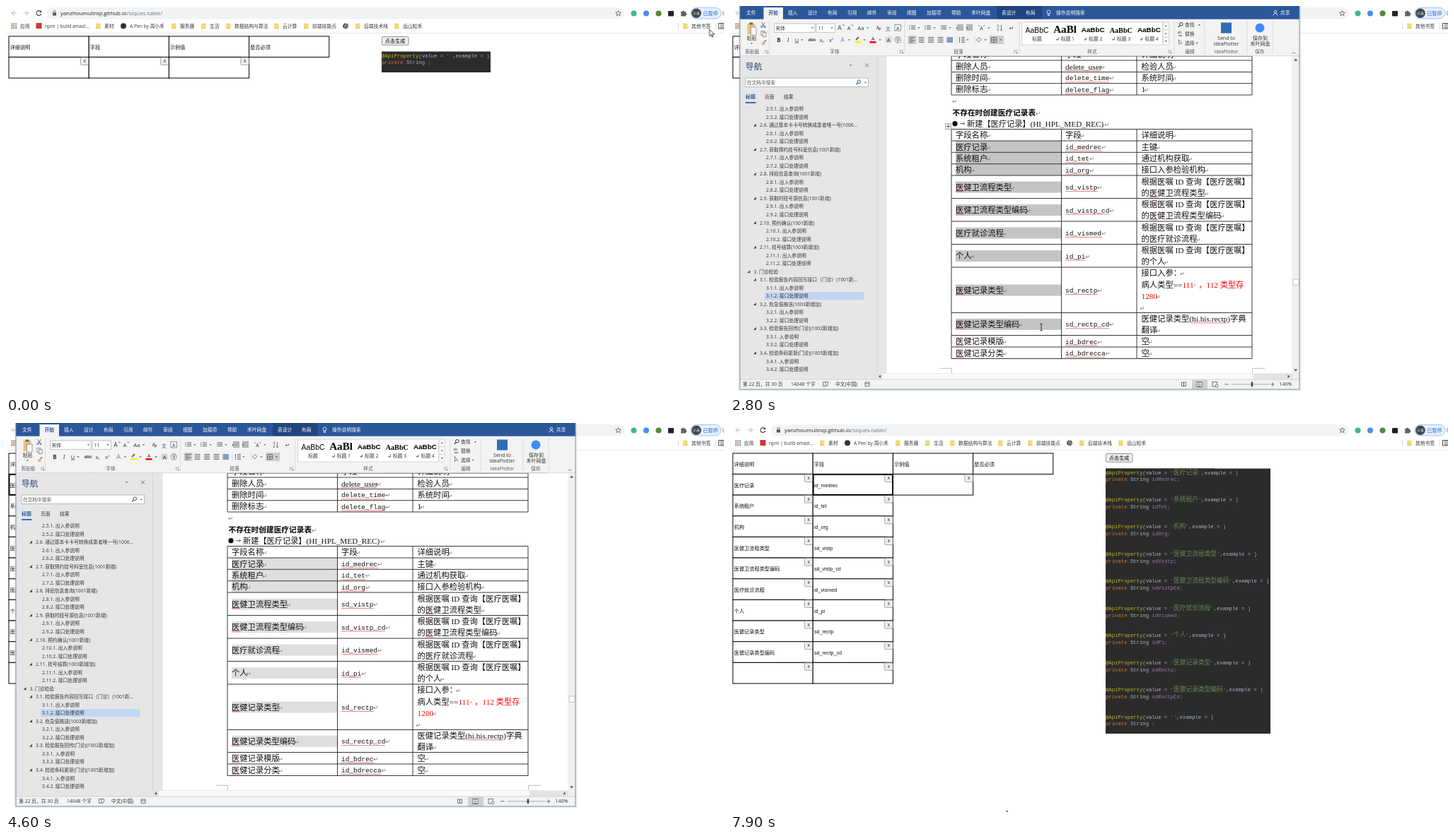
Recreate the animation shown at these times as an HTML page. Size 1015 by 551 pixels, loop 8000 ms.

```html
<!DOCTYPE html>
<html lang="zh-CN">
<head>
<meta charset="utf-8">
<title>Table to code</title>
<style>
html, body { margin: 0; width: 100%; height: 100%; overflow: hidden; background: #fff; }
svg { display: block; width: 1015px; height: 551px; }
text { white-space: pre; font-family: "Open Sans", "Noto Sans CJK SC", sans-serif; }
.page { font-family: "Liberation Sans", "Noto Sans CJK SC", sans-serif; }
.doc { font-family: "Liberation Serif", "Noto Sans CJK SC", serif; font-weight: 300; }
.serif { font-family: "Liberation Serif", serif; }
.mono { font-family: "Liberation Mono", "Noto Sans CJK SC", monospace; }
.mid { text-anchor: middle; }
.bold { font-weight: 700; }
.anim { animation: 8s step-end -.02s infinite; }
.row { animation: 8s step-end infinite half; animation-delay: calc(var(--t) - 8.02s); }

#cursor { animation-name: move; }
#arrow { animation-name: arrow; }
#beam { animation-name: beam; }
#word { animation-name: word; }
#handle { animation-name: handle; }
#font { animation-name: font; }
#pasted { animation-name: pasted; }
.late { animation-name: late; }
.early { animation-name: early; }
#focus1 { animation-name: focus1; }
#focus2 { animation-name: focus2; }
#sel1 { animation-name: sel1; }
#sel2 { animation-name: sel2; }
#sel3 { animation-name: sel3; }
#spill { animation-name: spill; }

@keyframes half { 0% { opacity: 1 } 50%, 100% { opacity: 0 } }
@keyframes word { 0%, 40%, 86.25% { opacity: 0 } 13.75%, 56.25% { opacity: 1 } 100% { opacity: 0 } }
@keyframes handle { 0%, 40% { opacity: 0 } 25%, 70%, 100% { opacity: 1 } }
@keyframes font { 0% { opacity: 0 } 22.5%, 100% { opacity: 1 } }
@keyframes pasted { 0% { opacity: 0 } 47.5%, 100% { opacity: 1 } }
@keyframes late { 0% { opacity: 0 } 92.5%, 100% { opacity: 1 } }
@keyframes early { 0% { opacity: 1 } 92.5%, 100% { opacity: 0 } }
@keyframes focus1 { 0%, 90%, 100% { opacity: 0 } 46.25% { opacity: 1 } }
@keyframes focus2 { 0% { opacity: 0 } 90%, 100% { opacity: 1 } }
@keyframes sel1 {
  0% { opacity: 0 } 28.75% { opacity: 1; fill: #c4c4c4 } 40% { opacity: 1; fill: #dedede }
  58.75% { opacity: 1; fill: #c4c4c4 } 66.25%, 100% { opacity: 0 }
}
@keyframes sel2 { 0% { opacity: 0 } 70%, 100% { opacity: 1 } }
@keyframes sel3 { 0% { opacity: 1; fill: #e4e4e4 } 15% { opacity: 1; fill: #c4c4c4 } 22.5%, 100% { opacity: 0 } }
@keyframes spill { 0%, 33.75%, 100% { opacity: 0 } 32.5% { opacity: 1 } }
@keyframes arrow { 0%, 37.5%, 82.5%, 100% { opacity: 1 } 15%, 58.75% { opacity: 0 } }
@keyframes beam { 0%, 37.5%, 82.5%, 100% { opacity: 0 } 15%, 58.75% { opacity: 1 } }
@keyframes move {
  0% { transform: translate(994.5px, 33px); animation-timing-function: steps(3) }
  3.75% { transform: translate(365px, 428px) }
  5% { transform: translate(365px, 428px); animation-timing-function: steps(4) }
  10% { transform: translate(371px, 560px) }
  13.75% { transform: translate(380px, 560px); animation-timing-function: steps(9) }
  25% { transform: translate(331px, 203px); animation-timing-function: steps(2) }
  27.5% { transform: translate(332px, 214px) }
  28.75% { transform: translate(330px, 200px); animation-timing-function: steps(3) }
  32.5% { transform: translate(482px, 405px); animation-timing-function: steps(2) }
  35% { transform: translate(440px, 455px); animation-timing-function: steps(3) }
  38.75%, 40% { transform: translate(851px, 246px) }
  41.25% { transform: translate(851px, 246px); animation-timing-function: steps(4) }
  46.25% { transform: translate(50px, 88px) }
  47.5% { transform: translate(50px, 88px); animation-timing-function: steps(6) }
  55% { transform: translate(371px, 560px) }
  58.75% { transform: translate(385px, 516px); animation-timing-function: steps(8) }
  68.75% { transform: translate(478px, 186px) }
  70% { transform: translate(478px, 200px); animation-timing-function: steps(7) }
  78.75% { transform: translate(540px, 452px) }
  80% { transform: translate(540px, 452px); animation-timing-function: steps(3) }
  83.75% { transform: translate(850px, 291px) }
  85% { transform: translate(859px, 291px) }
  86.25% { transform: translate(859px, 291px); animation-timing-function: steps(3) }
  90% { transform: translate(165px, 88px) }
  91.25% { transform: translate(165px, 88px); animation-timing-function: steps(6) }
  98.75%, 100% { transform: translate(391px, 549px) }
}
</style>
</head>
<body>
<svg id="stage" viewBox="0 0 1015 551"></svg>
<script>
const INK = '#333', BLUE = '#2b579a';

// y is the vertical middle of the glyphs
const T = (s, x, y, size = 6.8, fill = INK, cls = '') =>
  `<text x="${x}" y="${y + size * .37}" font-size="${size}" fill="${fill}" class="${cls}">${s}</text>`;
const R = (x, y, w, h, fill, more = '') =>
  `<rect x="${x}" y="${y}" width="${w}" height="${h}" fill="${fill}" ${more}/>`;
const P = (d, stroke = INK, w = .8, fill = 'none') =>
  `<path d="${d}" stroke="${stroke}" stroke-width="${w}" fill="${fill}"/>`;
const C = (x, y, r, fill, more = '') => `<circle cx="${x}" cy="${y}" r="${r}" fill="${fill}" ${more}/>`;
const G = (id, body, cls = 'anim') => `<g id="${id}" class="${cls}">${body}</g>`;
const each = (list, fn) => list.map(fn).join('');
const range = n => [...Array(n).keys()];
const span = (s, fill, more = '') => `<tspan fill="${fill}" ${more}>${s}</tspan>`;
const drop = (x, y) => P(`M${x - 1.7} ${y - .8}h3.4l-1.7 1.8z`, 'none', 0, '#555');
const bars = (x, y, widths, color = '#555') => each(widths, (w, i) => P(`M${x} ${y + i * 2.3}h${w}`, color, .9));
const lens = (x, y, color) => C(x + .8, y - .8, 2.3, 'none', `stroke="${color}"`) + P(`M${x - .8} ${y + .8}l-2.5 2.5`, color, 1.2);
const wave = (x, y, w) => P(`M${x} ${y}` + 'l1 1.2l1 -1.2'.repeat(Math.round(w / 2)), '#f33', .6);

const labels = ['医疗记录', '系统租户', '机构', '医健卫流程类型', '医健卫流程类型编码',
  '医疗就诊流程', '个人', '医健记录类型', '医健记录类型编码'];
const fields = ['id_medrec', 'id_tet', 'id_org', 'sd_vistp', 'sd_vistp_cd', 'id_vismed', 'id_pi', 'sd_rectp', 'sd_rectp_cd'];
const camel = s => s.replace(/_(.)/g, (_, c) => c.toUpperCase());

/* ---------- browser ---------- */
const folder = x => R(x, 24.5, 6.5, 7.5, '#f8d775', 'rx=".8"') + P(`M${x} 31.5h6.5`, '#e3b94a', .8);

function chrome() {
  const marks = [[127, '素材'], [234, '服务器'], [276, '生活'], [311, '数据结构与算法'], [379, '云计算'],
    [421, '前端技能点'], [494, '后端技术栈'], [549, '远山知禾'], [957, '其他书签']];
  return P('M15 10H8m3.5-3.5L8 10l3.500 3.500', '#b5b8bb', 1) + P('M25 10h7m-3.500-3.500L32 10l-3.500 3.500', '#b5b8bb', 1)
    + P('M49.300 8a3.400 3.400 0 1 0 .5 3', '#444', 1.100) + P('M50 6v3.200h-3.200z', 'none', 0, '#444')
    + R(58, 2, 816, 16.500, '#f1f3f4', 'rx="8"')
    + R(66, 9.300, 5, 4.200, '#555') + P('M67 9.500V8a1.500 1.500 0 0 1 3 0v1.500', '#555')
    + T(span('yanzhoumulinqi.github.io', '#222') + span('/siques-table/', '#70757a'), 77, 10.300, 7.900)
    + P('M865.500 6.500l1.100 2.500 2.700.2-2.100 1.800.7 2.700-2.400-1.500-2.400 1.500.7-2.700-2.100-1.800 2.700-.2z', '#555', .8)
    + C(887.500, 10.500, 4, '#41b883') + C(905, 10.500, 4, '#4a8df0') + C(922.500, 10.500, 4, '#4d8a3d') + R(936, 7, 8, 7.500, '#222', 'rx="1"')
    + P('M954 8h2a1.500 1.500 0 0 1 3 0h2v2a1.500 1.500 0 0 1 0 3v1.500h-7v-2a1.500 1.500 0 0 0 0-2.500z', 'none', 0, '#5f6368')
    + R(968, 2.500, 43, 15.500, '#e8f0fe', 'rx="7.750" stroke="#8ab4f8" stroke-width=".8"') + C(976, 10.300, 6.800, '#3d474d')
    + T('小禾', 976, 10.300, 5, '#fff', 'mid') + T('已暂停', 985.500, 10.300, 7, '#1967d2') + C(1018, 10.300, 4.500, 'none', 'stroke="#e35b52"')
    + each(range(9), i => R(7.500 + i % 3 * 2.900, 24.500 + (i / 3 | 0) * 2.900, 1.900, 1.900, ['#ea4335', '#34a853', '#4285f4'][i % 3]))
    + T('应用', 20, 28.300) + R(42.500, 24, 8, 8, '#cb3837') + T('npm | build amazi...', 55, 28.300, 6.700)
    + C(166, 28.300, 4, '#333') + T('A Pen by 周小禾', 175, 28.300, 6.700)
    + each(marks, ([x, s]) => folder(x) + T(s, x + 12, 28.300))
    + C(480, 28.300, 3.800, '#444') + P('M477.500 26.500l2 2-1 2.500M480.500 25l-.5 2 2.500 1.500-1 2', '#fff', .8)
    + P('M950.500 24v8.500M1003 24v8.500', '#ccc') + R(1007.500, 24.500, 9, 7.500, 'none', 'stroke="#555"') + bars(1009.500, 26, [6, 6, 6])
    + P('M0 38.500H1015', '#e3e4e6', .8);
}

const cellX = i => 4 + i * 113.200, rowY = i => 72.400 + i * 29.660;
function cell(col, row) {
  const x = cellX(col), y = rowY(row);
  return R(x, y, 113.200, 29.660, '#fff', 'stroke="#000"')
    + R(x + 101.500, y + .5, 11.500, 10.500, '#efefef', 'stroke="#858585" stroke-width=".7" rx="1"')
    + T('x', x + 107.200, y + 5.300, 6.500, '#222', 'page mid');
}
const cellText = (s, col, row) => T(s, cellX(col) + 1.700, rowY(row) + 15.500, 7.200, '#111', 'page');
const outline = (col, id) => G(id, `<rect x="${cellX(col) + .6}" y="72.900" width="112.200" height="28.800" rx="2" fill="none" stroke="#000" stroke-width="1.700"/>`);

/* ---------- generated code ---------- */
function entry(label, name, i) {
  const y = 69.900 + i * 38.450, purple = '#9876aa';
  const line = (s, x, dy, cls = '') => T(s, x, y + dy, 7.280, '#a9b7c6', 'mono ' + cls);
  const quoted = span(`'${span(label, '#6a8759', 'font-size="8.740"')}'`, '#6a8759');
  const tail = (s, cls) => line(span(s, purple), 531 + 15 * 4.370, 9.800, cls);
  return line(span('@ApiProperty', '#bbb529') + `(value = ${quoted},example = )`, 531, 0)
    + line(span('private', '#cc7832') + ' String', 531, 9.800)
    + (name ? tail(';', 'anim early') + tail(camel(name) + ';', 'anim late') : tail(';'));
}

function page() {
  const filled = range(9).map(i => i + 1);
  return each(['详细说明', '字段', '示例值', '是否必须'], (s, i) =>
      R(cellX(i), 42.900, 113.200, 29.500, '#fff', 'stroke="#000"') + T(s, cellX(i) + 1.500, 58.300, 7.200, '#111', 'page'))
    + cell(0, 0) + cell(1, 0) + cell(2, 0)
    + R(531.500, 43.500, 37.500, 11.800, '#efefef', 'stroke="#767676" stroke-width=".8" rx="1.500"') + T('点击生成', 535.800, 49.500, 7.200, '#000', 'page')
    + R(531, 64.500, 154, 29.500, '#2b2b2b') + entry('', '', 0)
    + G('pasted', each(filled, i => cell(0, i) + cell(1, i)) + each(labels, (s, i) => cellText(s, 0, i))
      + R(531, 64.500, 233, 375.500, '#2b2b2b') + each(labels, (s, i) => entry(s, fields[i], i)) + entry('', '', 9))
    + G('', each(fields, (s, i) => cellText(s, 1, i)), 'anim late')
    + outline(0, 'focus1') + outline(1, 'focus2');
}

/* ---------- word processor ---------- */
function ribbon() {
  const tabs = [[23, '文件'], [82, '插入'], [110, '设计'], [138, '布局'], [166, '引用'], [194, '邮件'], [222, '审阅'], [250, '视图'],
    [278, '加载项'], [313, '帮助'], [341, '禾叶网盘'], [384, '表设计'], [418, '布局'], [461, '操作说明搜索'], [778, '共享']];
  const groups = [[31.500, '剪贴板'], [148, '字体'], [323, '段落'], [512, '样式'], [650, '编辑'], [701.500, 'IdeaPlotter'], [749, '保存']];
  const styles = [['AaBbC', 10.400, 'page'], ['AaBl', 15.200, 'serif bold'], ['AaBbC', 9.900, 'page bold'],
    ['AaBbC', 10.200, 'serif bold'], ['AaBbC', 9.900, 'page bold']];
  const M = (s, x, y, size, fill, cls = '') => T(s, x, y, size, fill, 'mid ' + cls);
  return R(14, 0, 791, 19, BLUE) + R(377, 0, 64, 19, '#20457f') + R(47.500, 2, 27.500, 17, '#f3f3f3')
    + R(14, 18.700, 791, 52, '#f3f3f3') + P('M14 70.700H805', '#cfcfcf')
    + each(tabs, ([x, s]) => T(s, x, 9.800, 6.800, '#fff')) + T('开始', 54.500, 9.800, 6.800, BLUE, 'bold')
    + C(450.500, 8.500, 2.500, 'none', 'stroke="#fff" stroke-width=".8"') + P('M449.500 11v2.500h2V11', '#fff')
    + C(771, 8, 1.700, 'none', 'stroke="#fff" stroke-width=".8"') + P('M768 13.500a3 3 0 0 1 6 0', '#fff')
    + each(groups, ([x, s]) => M(s, x, 64.700, 6.700, '#555'))
    + each([55.500, 246.500, 409, 628, 671, 731, 767], x => P(`M${x} 22V68`, '#d5d5d5'))
    + each([52, 242.500, 404, 622], x => P(`M${x - 2} 67v-4h4M${x} 65l2 2v-2m0 2h-2`, '#666', .6))
    + R(24.500, 25, 11, 15, '#e9c47c', 'rx="1"') + R(27.500, 23.500, 5, 3, '#666') + R(29.500, 30, 7.500, 11, '#fff', 'stroke="#777" stroke-width=".7"')
    + M('粘贴', 30.500, 45.300) + drop(30.500, 53)
    + P('M44.500 23l4 6M49.500 23l-4 6', '#555') + C(44.800, 29.500, 1.200, 'none', 'stroke="#2b78c4"') + C(49, 29.500, 1.200, 'none', 'stroke="#2b78c4"')
    + R(44, 35.500, 4.500, 6, '#fff', 'stroke="#667" stroke-width=".7"') + R(46.500, 37.500, 4.500, 6, '#fff', 'stroke="#667" stroke-width=".7"')
    + P('M44.500 53.500l3-3 2.500 2.500-3 2z', '#b58a3d', .5, '#e9c47c') + P('M48.500 50.500l2.500-2', '#555', 1.500)
    + R(62.500, 25, 57.500, 12.300, '#fff', 'stroke="#b5b5b5" stroke-width=".8"') + R(122, 25, 26.500, 12.300, '#fff', 'stroke="#b5b5b5" stroke-width=".8"')
    + drop(116.500, 31) + drop(144, 31) + G('font', T('宋体', 64.500, 31.200) + T('11', 124.500, 31.200))
    + M('A', 155, 31, 8.500) + P('M159 28l1.300-1.500 1.300 1.500', BLUE) + M('A', 168, 31.500, 7.500) + P('M171.500 26.500l1.300 1.500 1.300-1.500', BLUE)
    + M('Aa', 185, 31, 7.800) + drop(194.500, 31) + M('A', 209, 30.500, 7) + P('M210 34l3-3', '#d77', 2.500)
    + M('文', 223.500, 32, 6.800, BLUE) + R(233, 26.500, 8.500, 8.500, '#fff', 'stroke="#666" stroke-width=".7"') + M('A', 237.200, 31, 7)
    + M('B', 69, 47.800, 8, INK, 'bold') + M('<tspan font-style="italic">I</tspan>', 82, 47.800, 8, INK, 'serif')
    + M('<tspan text-decoration="underline">U</tspan>', 94.500, 47.800, 7.500) + drop(102, 48)
    + M('<tspan text-decoration="line-through">abc</tspan>', 116, 48, 6.500) + M('x<tspan font-size="4" dy="1">2</tspan>', 129.500, 47.800, 7.500)
    + M('x<tspan font-size="4" dy="-3">2</tspan>', 143, 47.800, 7.500)
    + M('A', 159, 47.500, 9, '#4a87cf') + drop(168.500, 48) + P('M178 48l4-4', '#666', 2) + R(176.500, 49.800, 9, 2.500, '#fff200') + drop(190, 48)
    + M('A', 202, 46.500, 7.500) + R(197.500, 50, 9, 2.500, '#f00') + drop(212, 48)
    + R(219.500, 43.500, 9, 8.500, '#d5d5d5') + M('A', 224, 47.800, 7.500) + C(237.200, 47.800, 4.300, 'none', 'stroke="#666" stroke-width=".7"') + M('字', 237.200, 47.800, 5.500)
    + each([257, 279, 301], (x, i) => bars(x - 1, 28, [6, 6, 6]) + bars(x - 4 + (i > 1), 28, [1.500, 1.500, 1.500], BLUE) + drop(x + 10, 31))
    + each([325, 338], (x, i) => bars(x - 4, 27, [9, 9, 9, 9]) + P(`M${x - 4} 30.500l${i ? 2 : -1} 1.500`, BLUE, 1.500))
    + M('A', 355.500, 31, 7) + P('M351 27l2 2M360 27l-2 2', '#555') + drop(366, 31) + M('A', 379, 28.500, 5, BLUE) + M('Z', 379, 33.500, 5) + P('M383.500 27v8l-1.300-1.500m1.300 1.500l1.300-1.500', '#555')
    + M('↵', 398, 31, 7.500)
    + R(251.500, 42, 12, 12, '#cdcdcd') + bars(253.500, 44.500, [8, 5, 8, 5]) + bars(266.500, 44.500, [8, 8, 8, 8]) + bars(280, 44.500, [8, 8, 8, 8])
    + bars(293.500, 44.500, [8, 8, 8, 8]) + R(306.500, 44, 8.500, 8, '#7f9cc9') + P('M320 42v12M346 42v12', '#d5d5d5')
    + bars(327, 44.500, [5, 5, 5, 5]) + P('M324.500 44v8', BLUE) + drop(336, 48) + P('M348.500 48l3.500-3.500 3 3-3.500 3.500z', '#555') + drop(361, 48)
    + R(367, 42, 20, 12, '#cdcdcd') + P('M369.500 44.500h7v7h-7zM373 44.500v7M369.500 48h7', '#555') + drop(382.500, 48)
    + R(412.500, 23, 199, 32, '#fff', 'stroke="#ccc" stroke-width=".8"')
    + each(styles, ([s, size, cls], i) => M(s, 434 + i * 39.600, i === 1 ? 32 : 33.800, size, '#000', cls)
      + M((i ? '↲ ' : '') + '标题' + (i ? ' ' + i : ''), 434 + i * 39.600, 46.800))
    + each([0, 1, 2], i => R(612, 23 + i * 10.700, 8.500, 10.600, '#f8f8f8', 'stroke="#ccc" stroke-width=".7"') + drop(616.200, 28.500 + i * 10.700))
    + lens(637, 26.500, INK) + T('查找', 643, 26.700) + drop(663.500, 27) + T('ab', 632.500, 37.500, 5) + P('M634 42h5', BLUE, 1.200) + T('替换', 643, 39.500)
    + P('M634.500 47.500v7l2-1.500h2.500z', '#666') + T('选择', 643, 52) + drop(660, 52.500)
    + R(694, 23.500, 15, 15, '#2f6eb5') + M('Send to', 701.500, 45, 7) + M('IdeaPlotter', 701.500, 53.500, 7)
    + C(749, 31, 6.500, '#3f8cf5') + M('保存到', 749.500, 45, 7) + M('禾叶网盘', 749.500, 53, 7) + P('M794.500 68l2.500-2.500 2.500 2.500', '#666');
}

function outlinePane() {
  const heads = [['2.6', '通过基本卡卡号转换成患者唯一号(1006...'], ['2.7', '获取预约挂号科室信息(1001新增)'], ['2.8', '排班信息查询(1001新增)'],
    ['2.9', '获取时段号源信息(1001新增)'], ['2.10', '预约确认(1001新增)'], ['2.11', '挂号结算(1003新增加)'],
    ['3.1', '检验报告内容回写接口（门诊）(1001新...'], ['3.2', '危急值推送(1003新增加)'],
    ['3.3', '检验报告回传(门诊)(1002新增加)'], ['3.4', '检验条码更新(门诊)(1005新增加)']];
  const kids = n => [[2, n + '.1. ' + (n > '3.2' ? '' : '出') + '入参说明'], [2, n + '.2. 接口处理说明']];
  const items = kids('2.5');
  for (const [n, s] of heads) {
    if (n === '3.1') items.push([0, '3. 门诊检验']);
    items.push([1, `${n}. ${s}`], ...kids(n));
  }
  return R(14, 71, 193, 458, '#e6e6e6') + T('导航', 22, 85.500, 11.700, '#24416f') + drop(170.500, 84) + P('M191 81.500l5 5m0-5l-5 5', '#555')
    + R(22, 102, 173.500, 12.500, '#fff', 'stroke="#ababab" stroke-width=".8"') + T('在文档中搜索', 24, 108.300, 6.700, '#555') + lens(181.500, 108, BLUE) + drop(191.500, 108.500)
    + T('标题', 22, 128.800, 6.900, BLUE, 'bold') + T('页面', 49, 128.800) + T('结果', 76, 128.800) + R(22, 136, 14.500, 1.700, BLUE)
    + R(49, 405.200, 140, 11, '#c2d5f2')
    + each(items, ([level, s], i) => {
      const x = [33.500, 42, 51][level], y = 145.600 + i * 11.530;
      return T(s, x, y) + (level < 2 ? P(`M${x - 5} ${y - 2.200}v4h-4z`, 'none', 0, '#444') : '');
    });
}

const lineY = [174.500, 191, 207.300, 223.700, 240, 272.500, 305, 337.500, 370, 434.500, 466.500, 483, 499.500];
const midY = i => (lineY[i] + lineY[i + 1]) / 2 + .3;
const D = (s, x, y, mark = true, size = 11.300) =>
  T(s + (mark ? span(' ↵', '#777', 'font-size="8.500" dx="-2"').replace(' ↵', '↵') : ''), x, y, size, '#111', 'doc');
const code = (s, x, y) => T(s + span('↵', '#777', 'font-size="8.500"'), x, y, 9.450, '#111', 'mono') + wave(x, y + 5.300, s.length * 5.670);

function grid(ys) {
  const end = ys[ys.length - 1];
  return P(each(ys, y => `M313 ${y}H738`) + each([313, 468.500, 575, 738], x => `M${x} ${ys[0]}V${end}`), '#222', .9);
}

// one selected line per table row, appearing as the pointer passes it
const band = i => lineY[i + 2] - lineY[i + 1] < 17 ? [lineY[i + 1], 16.300] : [midY(i + 1) - 8, 16];
const bands = (x, w, n, t0, speed) => each(range(n), i => {
  const [y, h] = band(i), t = t0 + Math.max(1, Math.ceil((lineY[i + 1] - 200) / speed)) / 10;
  return `<rect x="${x}" y="${y}" width="${w}" height="${h}" ${t0 ? `class="row" style="--t:${t}s"` : ''}/>`;
});

function documentView() {
  const ask = '根据医嘱 ID 查询【医疗医嘱】', red = s => span(s, '#f00', 'font-weight="400"');
  const notes = [['详细说明'], ['主键'], ['通过机构获取'], ['接口入参检验机构'], [ask, '的医健卫流程类型'], [ask, '的医健卫流程类型编码'],
    [ask, '的医疗就诊流程'], [ask, '的个人'], ['接口入参：', '病人类型==' + red('111· ，112 类型存'), red('1280'), ''],
    ['医健记录类型(hi.his.rectp)字典', '翻译'], ['空'], ['空']];
  const names = ['字段名称', ...labels, '医健记录模版', '医健记录分类'], cols = [...fields, 'id_bdrec', 'id_bdrecca'];
  const old = [['人员', 'user', '检验人员'], ['时间', 'time', '系统时间'], ['标志', 'flag', '1']];
  const open = /根据|病人|rectp/;
  return R(207, 71, 598, 458, '#e6e6e6') + R(221.500, 71, 573, 449.500, '#fff') + P('M207.200 71V529', '#c6c6c6')
    + D('字段名称', 319, 69) + D('字段', 474, 69) + D('详细说明', 581.500, 69) + grid([71, 77, 93.500, 109.700, 126])
    + each(old, ([a, b, c], i) => {
      const y = 85.500 + i * 16.400;
      return D('删除' + a, 319, y) + D(c, 581.500, y)
        + (i ? code('delete_' + b, 474, y) : D('delete_' + b, 474, y) + wave(474, y + 5.300, 50));
    })
    + T('↵', 314, 134.500, 8.500, '#777') + T('不存在时创建医疗记录表' + span('↵', '#777', 'font-size="8.500" font-weight="400"'), 314.500, 150.800, 10.700, '#000', 'bold')
    + C(318, 166.700, 3.600, '#000') + P('M325 166.700h6.500m-2-2l2 2-2 2', '#333') + D('新建【医疗记录】(HI_HPL_MED_REC) ', 335, 166.700, true, 11.200)
    + G('sel3', R(575, 191, 163, 275.500, 'inherit').replace('fill="inherit"', ''))
    + G('sel1', bands(319, 149.500, 9, 2.300, 68.300))
    + `<g fill="#c4c4c4">${G('spill', bands(469, 106, 8, 0, 1)) + G('sel2', bands(469, 106, 9, 5.600, 36))}</g>`
    + grid(lineY)
    + each(names, (s, i) => D(s, 319, midY(i)) + (s.startsWith('医健') ? wave(319, midY(i) + 5.500, 11) : ''))
    + D('字段', 474, midY(0)) + each(cols, (s, i) => code(s, 474, midY(i + 1)))
    + each(notes, (lines, i) => each(lines, (s, k) => {
      const y = midY(i) + (k - (lines.length - 1) / 2) * 16.200;
      return D(s, 581.500, y, !open.test(s)) + (s.startsWith('的医健') ? wave(593, y + 5.500, 11) : '')
        + (s.includes('rectp') ? wave(653, y + 5.500, 50) : '');
    }))
    + G('handle', R(304.500, 166.500, 8, 8, '#fff', 'stroke="#888" stroke-width=".7"') + P('M308.500 167.500v6M305.500 170.500h6', '#444'))
    + P('M297 513.300h16.300V520M756 513.300h-17.500V520', '#aaa');
}

function frame() {
  return R(795, 71, 10, 458, '#f0f0f0') + R(796, 387, 8, 8.500, '#fff', 'stroke="#aaa" stroke-width=".7"')
    + P('M797 77.500l2.700-3 2.700 3z', 'none', 0, '#555') + P('M797 514.500l2.700 3 2.700-3z', 'none', 0, '#555')
    + R(207, 520.500, 588, 8.500, '#e3e3e3') + R(216, 520.800, 524, 8, '#fafafa') + P('M213 522.500l-3 2.300 3 2.300zM788.500 522.500l3 2.300-3 2.300z', 'none', 0, '#555')
    + R(14, 529, 791, 14, '#f3f3f3') + P('M14 529H805', '#cfcfcf')
    + T('第 22 页，共 30 页', 18, 535.800) + T('14048 个字', 86, 535.800) + T('中文(中国)', 149, 535.800)
    + P('M131.500 532.500h3.500v6h-3.500zM135 532.500h3.500v3M136 537l1 1.500 2-3', '#555') + P('M191 533h6v5.500h-6zM191 535h6', '#555')
    + R(653, 529.500, 22, 13.300, '#cfcfcf') + P('M638.500 533h3v5.500h-3zM641.500 533h3v5.500h-3z', '#555') + R(660, 532.500, 7, 7, '#fff', 'stroke="#555" stroke-width=".8"') + bars(661.500, 534, [4, 4, 4])
    + R(682, 532.500, 6.500, 6.500, 'none', 'stroke="#555" stroke-width=".8"') + C(688, 538, 2, '#f3f3f3', 'stroke="#555" stroke-width=".7"')
    + P('M699.500 535.800h5M764.500 535.800h5M767 533.300v5', '#444') + P('M709 535.800H763', '#999') + R(736.700, 532.500, 2.500, 6.500, '#444') + T('140%', 776.500, 535.800, 7)
    + R(14, -2, 791, 545, 'none', 'stroke="#6f87ae" stroke-width=".9"');
}

const pointer = G('cursor',
  G('arrow', P('M0 0V9.600L2.200 7.600L3.700 11L5.200 10.300L3.700 7.100H6.800Z', '#111', .8, '#fff'))
  + G('beam', P('M-1.800 -5Q0 -5 0 -4V4Q0 5 -1.800 5M1.800 -5Q0 -5 0 -4M0 4Q0 5 1.800 5', '#222', .9)));

document.getElementById('stage').innerHTML = R(0, 0, 1015, 551, '#fff') + chrome() + page()
  + G('word', R(12, 0, 795, 545, '#000', 'opacity=".08"') + documentView() + ribbon() + outlinePane() + frame()) + pointer;
</script>
</body>
</html>
```
